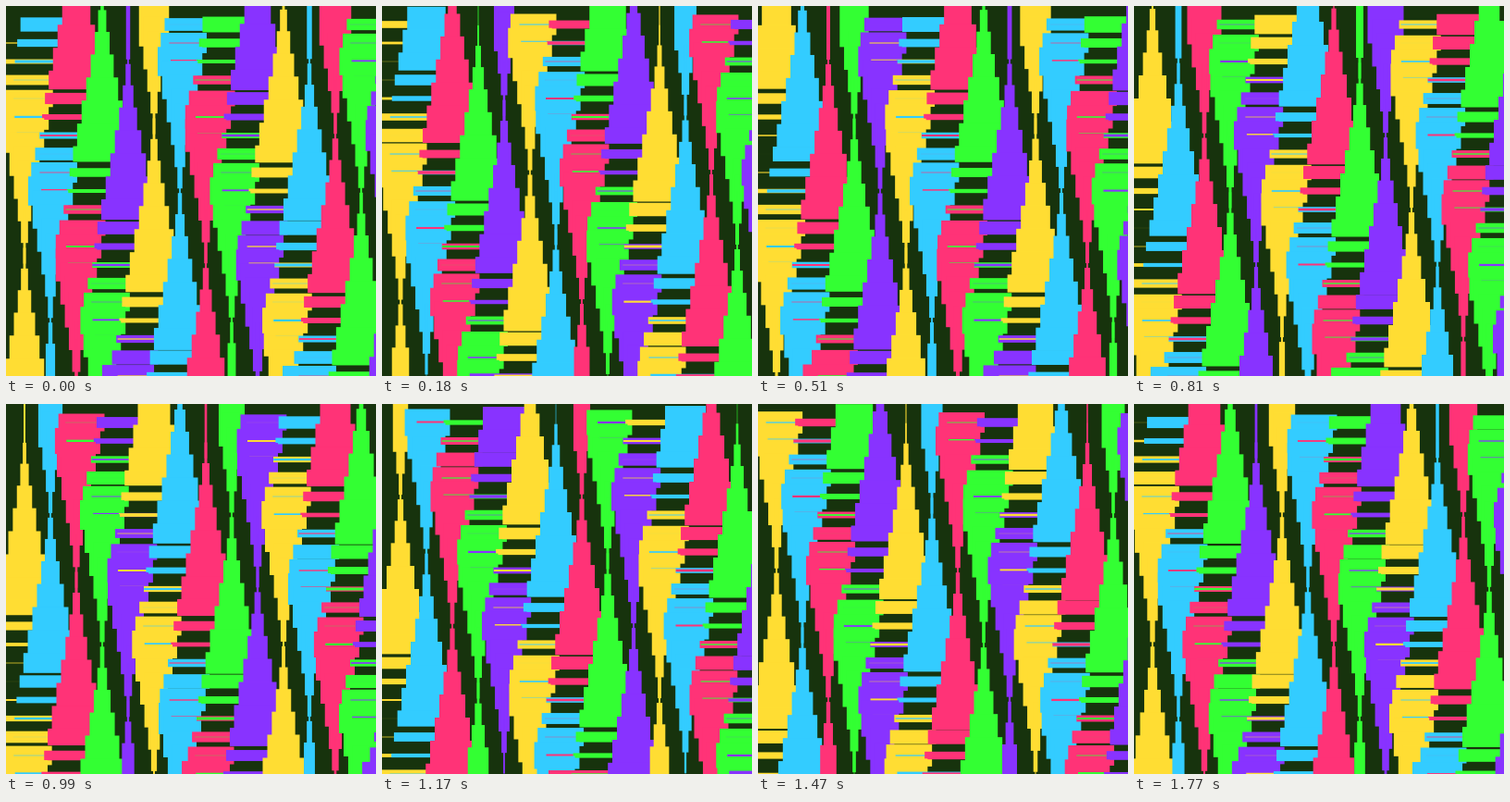
An HTML page with a canvas for the animation above (1800 ms loop, 400 by 400 pixels).

```html
<!DOCTYPE html>
<html lang="en">
<head>
<meta charset="utf-8">
<title>Twisting columns</title>
<style>
  html, body { margin: 0; width: 100%; height: 100%; overflow: hidden; background: #17330d; }
  canvas { display: block; width: 400px; height: 400px; }
</style>
</head>
<body>
<canvas id="stage" width="400" height="400"></canvas>
<script>
const ctx = document.getElementById('stage').getContext('2d');
const BACK = '#17330d';
const COLORS = ['#ffdd33', '#33ccff', '#ff3377', '#33ff33', '#8833ff'];
const LOOP = 1800, STEP = 30;
const COLS = 15, ROWS = 20;
const START = 20, GAP_X = 28, GAP_Y = 20, SIZE = 80;
// Phase shift between neighbours, in turns
const COL_SHIFT = 0.144, ROW_SHIFT = 0.04;

function draw(turn) {
  ctx.fillStyle = BACK;
  ctx.fillRect(0, 0, 400, 400);
  // Row by row, so that lower rows cover the ones above
  for (let row = 0; row < ROWS; row++) {
    for (let col = 0; col < COLS; col++) {
      const phase = row * ROW_SHIFT - col * COL_SHIFT - turn;
      const h = SIZE * Math.sin(Math.PI * phase) ** 2;
      const w = SIZE - h;
      const x = START + col * GAP_X;
      const y = START + row * GAP_Y;
      ctx.fillStyle = COLORS[col % COLORS.length];
      ctx.fillRect(x - w / 2, y - h / 2, w, h);
    }
  }
}

const begin = performance.now();

function tick() {
  const time = (performance.now() - begin) % LOOP;
  draw(Math.floor(time / STEP) * STEP / LOOP);
  requestAnimationFrame(tick);
}
tick();
</script>
</body>
</html>
```
